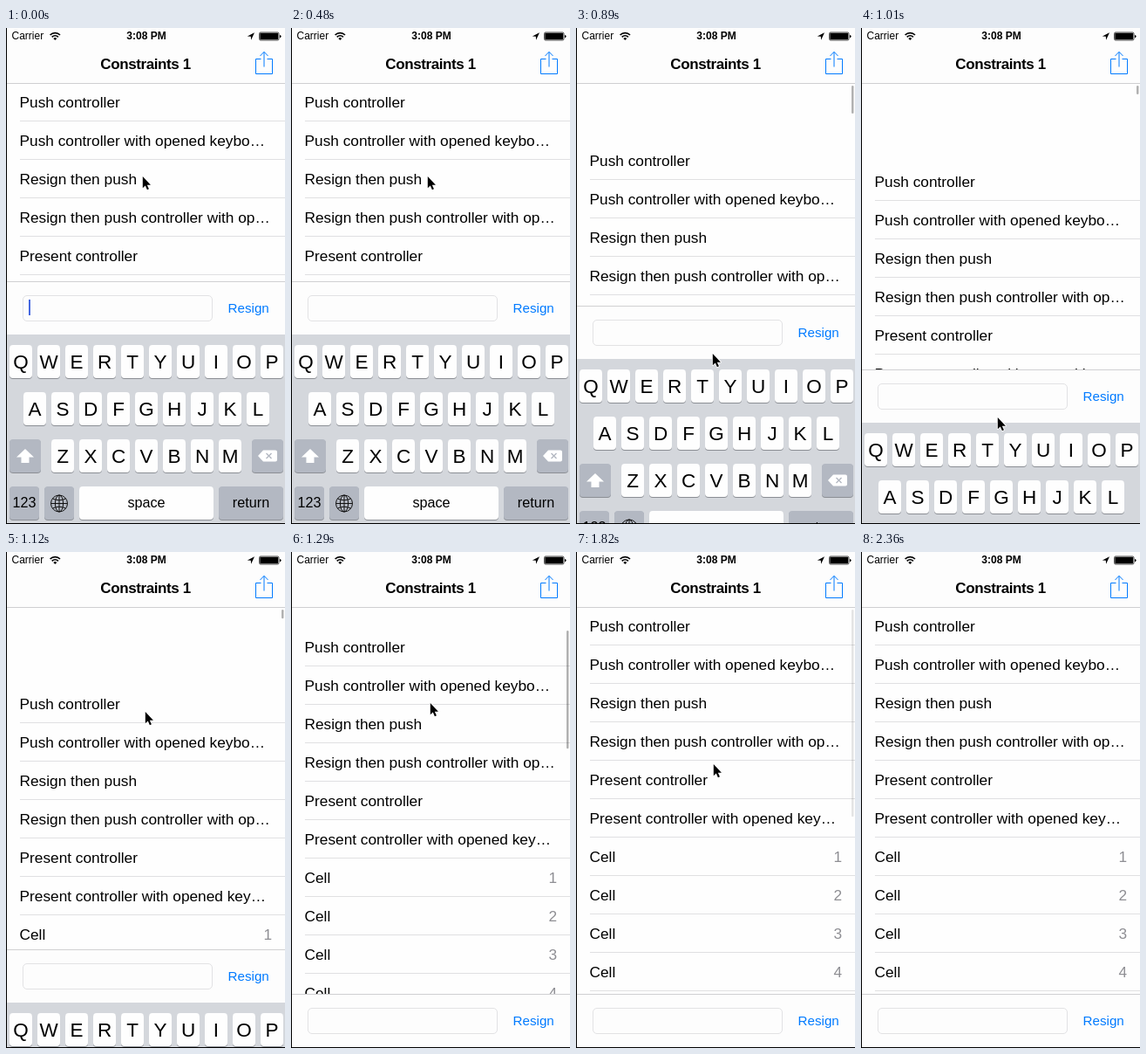
An HTML page for the animation above (4350 ms loop, 320x568 px).

```html
<!DOCTYPE html>
<html lang="en">
<head>
<meta charset="utf-8">
<title>Constraints 1</title>
<style>
  html, body { margin: 0; width: 100%; height: 100%; overflow: hidden; background: #fefefe; }
  svg { display: block; width: 100vw; height: 100vh; }
  text { font: 17.3px "Liberation Sans", Arial, Helvetica, sans-serif; white-space: pre; }
  .mid { text-anchor: middle; }
  .end { text-anchor: end; fill: #8e8e93; }
  .small { font-size: 12px; }
  .bold { font-weight: bold; }
  .title { letter-spacing: -.4px; font-size: 17px; }
  .action { font-size: 15.2px; fill: #007aff; }
  .letter { font-size: 22.5px; }
  .word { font-size: 16.2px; }
  .line { fill: none; stroke: #007aff; }
</style>
</head>
<body>
<svg viewBox="0 0 320 568">
  <rect width="320" height="568" fill="#fefefe"/>
  <g id="list"></g>
  <rect id="thumb" x="316" width="2.5" rx="1.25" fill="#000" fill-opacity=".3"/>

  <g id="nav">
    <rect width="320" height="63" fill="#fdfdfd"/>
    <rect y="63" width="320" height="1" fill="#cfcfd1"/>
    <text class="small" x="6.5" y="13">Carrier</text>
    <path d="M50.6 8a8 8 0 0 1 11.4 0M52.7 10.3a5 5 0 0 1 7.2 0" fill="none" stroke="#000" stroke-width="1.7"/>
    <path d="M54.3 12a2.8 2.8 0 0 1 4 0l-2 2.1z"/>
    <text class="small bold mid" x="161" y="13">3:08 PM</text>
    <path d="M285 5.2l-8.2 4.2 4 .3.3 4z"/>
    <rect x="290.5" y="5" width="22.5" height="9" rx="1.5" fill="none" stroke="#000" stroke-width=".7"/>
    <rect x="291.3" y="5.8" width="20.9" height="7.4" rx=".6"/>
    <path d="M314 8a1.6 1.6 0 0 1 0 3.2z"/>
    <text class="title bold mid" x="160" y="47">Constraints 1</text>
    <path class="line" d="M292.5 35.5h-6v17h19v-17h-6M296 44.5v-17M291.5 32l4.5-4.7 4.500 4.7"/>
  </g>

  <g id="dock">
    <rect y="290" width="320" height="61" fill="#fdfdfd"/>
    <rect y="290" width="320" height="1" fill="#d0d0d2"/>
    <rect x="19.5" y="306.5" width="217" height="29" rx="4.5" fill="#fdfdfd" stroke="#e2e2e4"/>
    <rect id="caret" x="26" y="311" width="2" height="18" fill="#4668e0"/>
    <text class="action" x="254.5" y="326">Resign</text>
    <rect y="351" width="320" height="217" fill="#d4d7dc"/>
    <g id="keys"></g>
    <path d="M22 482l10 9.5h-5.5v6.5h-9v-6.5h-5.5z" fill="#fff"/>
    <path d="M289 490l6-6.5h14a2 2 0 0 1 2 2v9a2 2 0 0 1-2 2h-14z" fill="#fff"/>
    <path d="M298.5 487l6 6m0-6l-6 6" stroke="#b3b8c2" stroke-width="1.4"/>
    <g fill="none" stroke="#111">
      <circle cx="61" cy="544.5" r="9.5"/>
      <ellipse cx="61" cy="544.5" rx="4.6" ry="9.5"/>
      <path d="M61 535v19M51.5 544.5h19M53.5 539q7.5 3.5 15 0M53.5 550q7.5-3.5 15 0"/>
    </g>
  </g>

  <path d="M0 0h1v567h319v1h-320z"/>
  <g id="pointer">
    <path d="M0 0v15l3.4-3.2 2.4 5.4 2.3-1-2.4-5.2h4.7z" transform="translate(.8 1) scale(.88)"
      stroke="#fff" stroke-width="2" paint-order="stroke" stroke-linejoin="round"/>
  </g>
</svg>
<script>
const $ = id => document.getElementById(id);

function add(parent, tag, attrs, label) {
  const el = document.createElementNS("http://www.w3.org/2000/svg", tag);
  for (const name in attrs) el.setAttribute(name, attrs[name]);
  if (label) el.textContent = label;
  parent.appendChild(el);
}

// List rows
const rows = [
  "Push controller", "Push controller with opened keybo…",
  "Resign then push", "Resign then push controller with op…",
  "Present controller", "Present controller with opened key…"
];
for (let i = 0; i < 11; i++) {
  const y = 63 + i * 44;
  add($("list"), "text", { x: 15.5, y: y + 28 }, rows[i] || "Cell");
  if (i > 5) add($("list"), "text", { class: "end", x: 305, y: y + 28 }, String(i - 5));
  add($("list"), "rect", { x: 16, y: y + 43, width: 304, height: 1, fill: "#e0e0e2" });
}

// Keyboard
function key(x, y, width, label, kind, dark) {
  const box = { x, width, height: 38, rx: 4 };
  add($("keys"), "rect", { ...box, y: y + 1, fill: "#8b8e94" });
  add($("keys"), "rect", { ...box, y, fill: dark ? "#b3b8c2" : "#fefefe" });
  if (label) {
    const base = kind === "letter" ? 27 : 24;
    add($("keys"), "text", { class: "mid " + kind, x: x + width / 2, y: y + base }, label);
  }
}
[["QWERTYUIOP", 4], ["ASDFGHJKL", 20], ["ZXCVBNM", 52]].forEach(([letters, left], r) =>
  [...letters].forEach((c, i) => key(left + i * 32, 363 + r * 54, 26, c, "letter")));
key(4, 471, 36, "", "", true);
key(282, 471, 36, "", "", true);
key(4, 525, 34, "123", "word", true);
key(44, 525, 34, "", "", true);
key(84, 525, 154, "space", "word");
key(244, 525, 74, "return", "word", true);

const loop = 4350, refresh = 58.2;
const press = 600, release = 1056;
const dockTravel = 216;

// 0 to 1 between two moments
const ramp = (t, from, to) => Math.min(1, Math.max(0, (t - from) / (to - from)));

// How far the drag has gone; the finger is already moving when it presses
const drag = t => t < press ? 0 : (Math.min(t, release) - 557) / 512;

// Pointer moves after the release: start, end, x, y
const legs = [
  [release, 1114, 159, 182], [1114, 1289, 159, 172], [1289, 1522, 159, 180],
  [1580, 1696, 157, 242], [1988, 2337, 212, 600]
];
function pointer(t) {
  let x = 156, y = 169 + 320 * drag(t);
  for (const [from, to, toX, toY] of legs) {
    const p = ramp(t, from, to);
    x += (toX - x) * p;
    y += (toY - y) * p;
  }
  return [x, y];
}

// The list follows the drag, then springs back, critically damped
function scroll(t) {
  const swing = Math.max(0, t - release) * .0121;
  const pull = t < release ? drag(t) : 1;
  return 105.5 * pull * (1 + swing) * Math.exp(-swing);
}

// The keyboard is pushed by the finger, then slides out
function drop(t) {
  const pushed = Math.max(0, 320 * drag(t) - 175);
  const p = ramp(t, release, 1289);
  return dockTravel - (dockTravel - pushed) * (1 - p) ** 1.5;
}

const move = (id, x, y) =>
  $(id).setAttribute("transform", `translate(${Math.round(x)} ${Math.round(y)})`);

function draw(now) {
  // The screen refreshes about 17 times a second
  const t = 9 + refresh * Math.floor((now % loop - 9) / refresh);
  const offset = scroll(t), down = drop(t), open = down === dockTravel;
  move("list", 0, offset);
  move("dock", 0, down);
  move("pointer", ...pointer(t));
  $("thumb").setAttribute("y", 66 + (open ? offset : 0));
  $("thumb").setAttribute("height", open ? 237.5 - 4.27 * offset : Math.max(10, 99 - offset));
  $("thumb").setAttribute("opacity", ramp(t, press, 700) - ramp(t, 1700, 1870));
  $("caret").setAttribute("opacity", 1 - ramp(t, 300, 474));
}

const start = performance.now();
function frame() {
  draw(performance.now() - start);
  requestAnimationFrame(frame);
}
frame();
</script>
</body>
</html>
```
